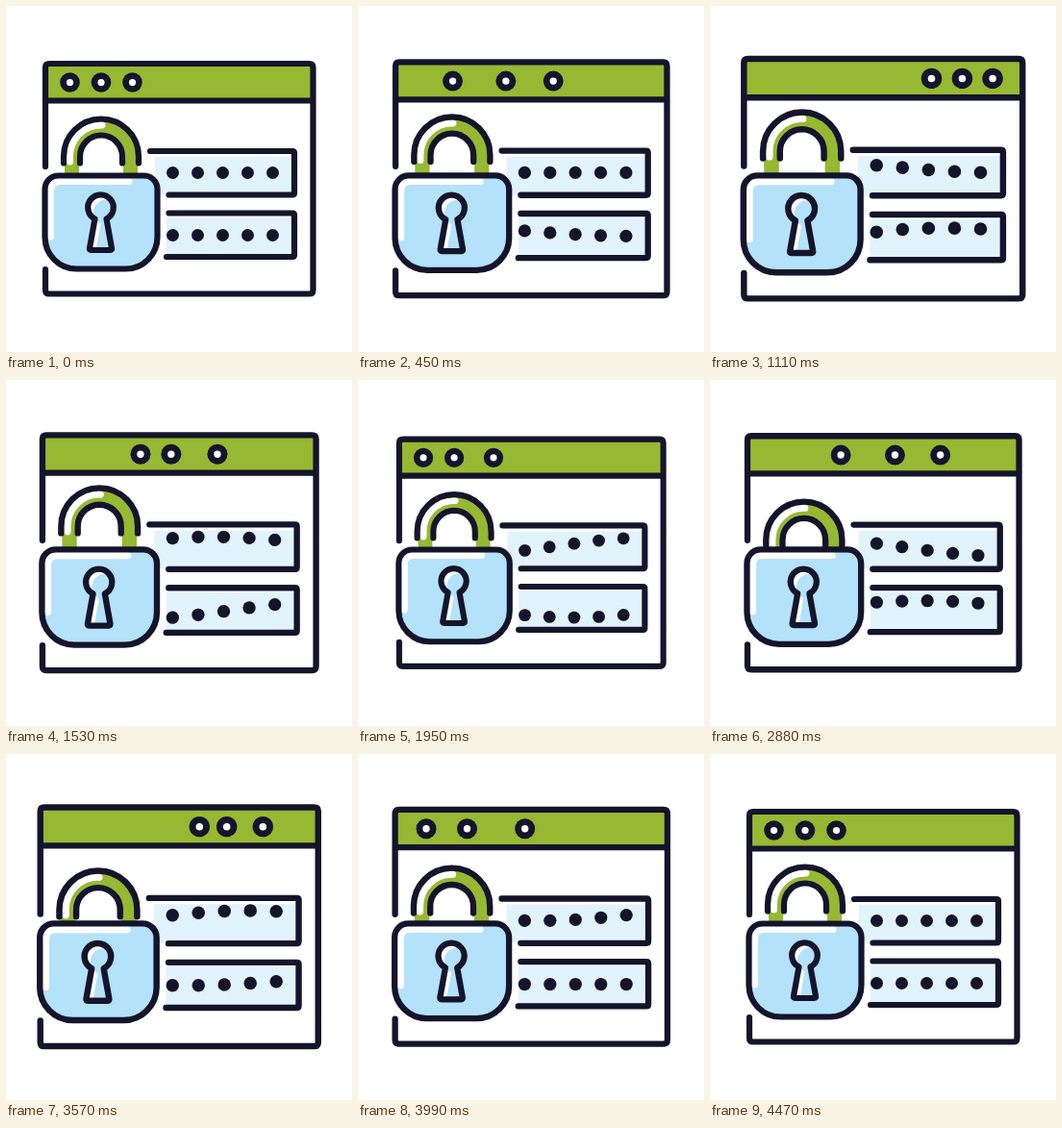
An HTML page for the animation above (4500 ms loop, 360 px wide and 360 px high).

```html
<!DOCTYPE html>
<html lang="en">
<head>
<meta charset="utf-8">
<title>Secure login</title>
<style>
  html, body { margin: 0; width: 100%; height: 100%; overflow: hidden; background: #fff; }
  svg { display: block; width: 100%; height: 100%; }
  .line { fill: none; stroke: #14142b; stroke-width: 6.2; stroke-linecap: round; stroke-linejoin: round; }
  .shine { fill: none; stroke: #fff; stroke-width: 7; stroke-linecap: round; stroke-linejoin: round; }
  .dark { fill: #14142b; }
  .green { fill: #97b832; }
  .blue { fill: #b4e2fb; }
  .pale { fill: #e1f3fd; }
</style>
</head>
<body>
<svg viewBox="0 0 360 360">
  <defs>
    <path id="body" d="M54.5 176.5H143.5A14 14 0 0 1 157.5 190.5V240.5A33 33 0 0 1 124.5 273.5H73.5A33 33 0 0 1 40.5 240.5V190.5A14 14 0 0 1 54.5 176.5Z"/>
    <path id="keyhole" d="M92.5 221.5A13.3 13.3 0 1 1 104.5 221.5L110 252Q110.3 254 108.5 254H88.5Q86.7 254 87 252Z"/>
    <clipPath id="hole"><use href="#keyhole"/></clipPath>
  </defs>
  <g id="scene">
    <path class="green" d="M41 60H319.5V98.5H41Z"/>
    <path class="line" d="M41 167V64Q41 60 45 60H315.5Q319.5 60 319.5 64V295.5Q319.5 299.5 315.5 299.5H45Q41 299.5 41 295.5V274M41 98.5H319.5"/>
    <g id="buttons"></g>

    <path class="pale" d="M155 157H299V196H155ZM167 220H299V260H167Z"/>
    <path class="line" d="M150 151H298Q300 151 300 153V194.5Q300 196.5 298 196.5H169.5M169.5 215.5H298Q300 215.5 300 217.5V259Q300 261 298 261H167"/>
    <g id="dots"></g>

    <g id="shackle">
      <path class="green" d="M61 195V156.5A38 38 0 0 1 137 156.5V195H122V156.5A23 23 0 0 0 76 156.5V195Z"/>
      <path class="shine" d="M66.5 162V156.5A32.5 32.5 0 0 1 100 124"/>
      <path fill="#fff" d="M78 180V156.5A21 21 0 0 1 120 156.5V180Z"/>
      <path class="line" d="M60 163.5V156.5A39 39 0 0 1 138 156.5V163.5M77 163.5V156.5A22 22 0 0 1 121 156.5V163.5"/>
    </g>

    <use href="#body" class="blue"/>
    <path class="shine" d="M46.5 240V192Q46.5 182.5 56 182.5H128"/>
    <use href="#body" class="line"/>
    <use href="#keyhole" fill="#fff"/>
    <g clip-path="url(#hole)"><use href="#keyhole" class="blue" x="6" y="5"/></g>
    <use href="#keyhole" class="line"/>
  </g>
</svg>
<script>
const LOOP = 4500;
const $ = id => document.getElementById(id);

function add(parent, tag, attrs) {
  const el = document.createElementNS('http://www.w3.org/2000/svg', tag);
  for (const name in attrs) el.setAttribute(name, attrs[name]);
  return parent.appendChild(el);
}

// Values at given times, eased in and out between neighbours
function track(t, times, values) {
  if (t <= times[0]) return values[0];
  for (let i = 1; i < times.length; i++) {
    if (t < times[i]) {
      const p = (t - times[i - 1]) / (times[i] - times[i - 1]);
      return values[i - 1] + (values[i] - values[i - 1]) * (1 - Math.cos(Math.PI * p)) / 2;
    }
  }
  return values[values.length - 1];
}

const TRAVEL = 162;
const buttons = [
  [170, 1110, 1110, 1910, 2460, 3380, 3380, 4080],
  [70, 1030, 1050, 1955, 2360, 3310, 3320, 4160],
  [5, 970, 1000, 2120, 2300, 3260, 3260, 4370]
].map((times, i) => {
  const el = add($('buttons'), 'g', {});
  const at = { cx: 66.5 + 32.5 * i, cy: 79.5 };
  add(el, 'circle', { ...at, r: 10.3, class: 'dark' });
  add(el, 'circle', { ...at, r: 3.6, fill: '#fff' });
  return { el, times };
});

const DOT_DELAY = 110;
const dots = [];
[
  { y: 173.5, swing: 10, times: [640, 1370, 2300, 3260, 3900] },
  { y: 238.5, swing: 9.5, times: [0, 840, 1730, 2660, 3500] }
].forEach(({ y, swing, times }) => {
  for (let i = 0; i < 5; i++) {
    const el = add($('dots'), 'circle', { cx: 173.5 + 26 * i, cy: y, r: 6.5, class: 'dark' });
    dots.push({ el, y, swing, times, delay: i * DOT_DELAY });
  }
});

function draw(t) {
  const scale = track(t, [0, 1125, 2250, 3375, LOOP], [1, 1.041, 0.976, 1.041, 1]);
  $('scene').setAttribute('transform', `translate(180 180) scale(${scale}) translate(-180 -180)`);

  const lift = track(t, [0, 1300, 2880, LOOP], [0, -4.4, 10, 0]);
  $('shackle').setAttribute('transform', `translate(0 ${lift})`);

  for (const { el, times } of buttons) {
    const x = track(t, times, [0, TRAVEL, TRAVEL, 0, 0, TRAVEL, TRAVEL, 0]);
    el.setAttribute('transform', `translate(${x} 0)`);
  }
  for (const { el, y, swing, times, delay } of dots) {
    el.setAttribute('cy', y + swing * track(t - delay, times, [0, -1, 1, -1, 0]));
  }
}

function tick() {
  draw(performance.now() % LOOP);
  requestAnimationFrame(tick);
}
tick();
</script>
</body>
</html>
```
